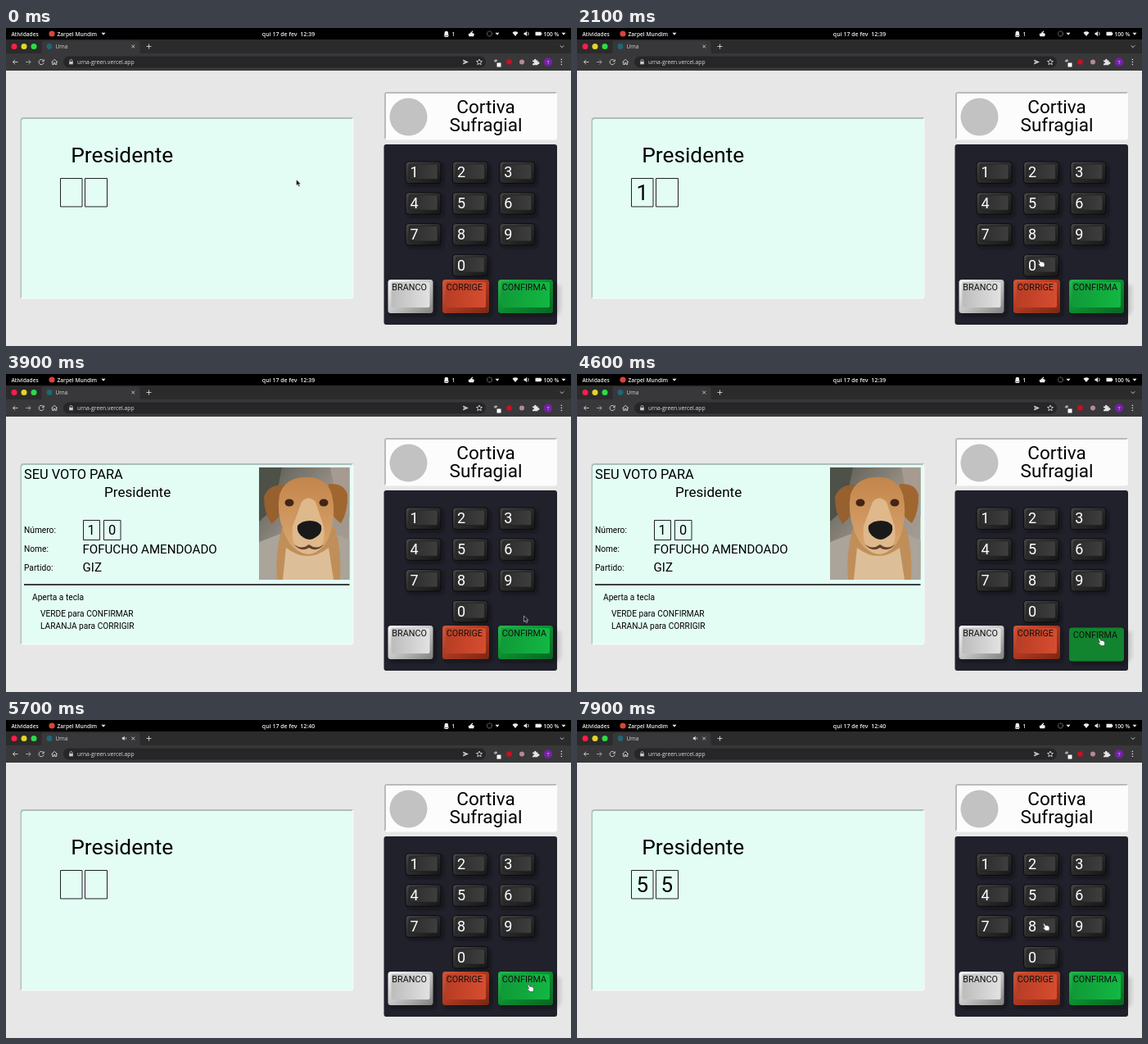
An HTML page for the animation above (8000 ms loop, 690 by 388 pixels).

```html
<!DOCTYPE html>
<html lang="pt-BR">
<head>
<meta charset="utf-8">
<title>Urna</title>
<style>
html, body { margin: 0; width: 100%; height: 100%; overflow: hidden; background: #e6e7e6; }
svg { display: block; width: 690px; height: 388px; font-family: Roboto, sans-serif; cursor: default; user-select: none; }
.ui { font-family: "Open Sans", sans-serif; font-size: 6.6px; fill: #dcdcdc; }
.bold { font-weight: 600; fill: #eee; }
.line { fill: none; stroke: #d2d3d5; stroke-width: .9; }
.mid { text-anchor: middle; }
.box { fill: none; stroke: #222; stroke-width: 1; }
</style>
</head>
<body>
<svg id="stage" viewBox="0 0 690 388" xmlns="http://www.w3.org/2000/svg">
  <defs>
    <linearGradient id="rim" x2="1" y2="1"><stop stop-color="#484848"/><stop offset=".5" stop-color="#2b2b2b"/><stop offset="1" stop-color="#161616"/></linearGradient>
    <linearGradient id="face" x2="1"><stop stop-color="#2c2c2c"/><stop offset="1" stop-color="#3e3e3e"/></linearGradient>
    <linearGradient id="whiteRim" x2="1" y2="1"><stop stop-color="#f4f4f4"/><stop offset=".5" stop-color="#c6c6c6"/><stop offset="1" stop-color="#808080"/></linearGradient>
    <linearGradient id="whiteFace" x2="1"><stop stop-color="#bcbcbc"/><stop offset="1" stop-color="#e2e2e2"/></linearGradient>
    <linearGradient id="redRim" x2="1" y2="1"><stop stop-color="#d0573b"/><stop offset=".5" stop-color="#aa3820"/><stop offset="1" stop-color="#7a2613"/></linearGradient>
    <linearGradient id="redFace" x2="1"><stop stop-color="#b83d25"/><stop offset="1" stop-color="#d64d30"/></linearGradient>
    <linearGradient id="greenRim" x2="1" y2="1"><stop stop-color="#25b84d"/><stop offset=".5" stop-color="#0b8c30"/><stop offset="1" stop-color="#086422"/></linearGradient>
    <linearGradient id="greenFace" x2="1"><stop stop-color="#109a38"/><stop offset="1" stop-color="#12b843"/></linearGradient>
    <linearGradient id="wall" x2="1" y2="1"><stop stop-color="#55584f"/><stop offset=".5" stop-color="#9a9188"/><stop offset="1" stop-color="#aaa298"/></linearGradient>
    <linearGradient id="fur" x2="0" y2="1"><stop stop-color="#c4854a"/><stop offset="1" stop-color="#d8a873"/></linearGradient>
    <filter id="soft" x="-30%" y="-30%" width="160%" height="160%"><feGaussianBlur stdDeviation="2"/></filter>
    <clipPath id="photo"><path d="M309 114H419.5V251H309z"/></clipPath>
  </defs>

  <!-- desktop bar -->
  <path d="M0 0H690V14H0z"/>
  <g class="ui bold">
    <text x="6.5" y="9.5">Atividades</text>
    <circle cx="56" cy="7" r="3.6" fill="#db4437"/>
    <text x="62.5" y="9.5">Zarpel Mundim</text>
    <text class="mid" x="345" y="9.5" id="clock" xml:space="preserve" style="font-size:7px"></text>
    <text x="544.5" y="9.5">1</text>
    <text x="656.5" y="9.5">100 %</text>
    <path d="M116.500 5.800h5l-2.500 3zM597.500 5.800h5l-2.500 3zM678.500 5.800h5l-2.500 3z"/>
    <path d="M534.500 9.500l1-1.500V6a2.300 2.300 0 0 1 4.600 0V8l1 1.500zM535.500 10h4.500v1h-4.500z"/>
    <path d="M564.500 7.500l2-1 3-3 1 .6-1.600 2 2.200.3.8 1.600-1 2.300h-5.400z"/>
    <circle cx="590.5" cy="7" r="3" fill="none" stroke="#bbb" stroke-width=".8" stroke-dasharray="1.5 .7"/>
    <path d="M618.500 5.700a5 5 0 0 1 7 0L622 10z"/>
    <path d="M632.500 5.700h1.600l2-1.900v6.400l-2-1.900h-1.600z"/>
    <path d="M637.300 5q2 2 0 4" fill="none" stroke="#eee" stroke-width=".8"/>
    <path d="M646.500 4.800h6.800v1h1v2.400h-1v1h-6.800z"/>
  </g>

  <!-- browser frame -->
  <path d="M0 14H690V32H0z" fill="#2b2b2c"/>
  <path d="M0 31H690V52H0z" fill="#38383a"/>
  <path d="M41 31.500q2.500 0 2.500-3V18.500q0-3 3-3H160.500q3 0 3 3V28.500q0 3 3 3z" fill="#38383a"/>
  <circle cx="10" cy="22.5" r="3.5" fill="#fa1f4a"/>
  <circle cx="22" cy="22.5" r="3.5" fill="#e2d528"/>
  <circle cx="34" cy="22.5" r="3.5" fill="#2bdc4a"/>
  <circle cx="53" cy="22.5" r="3.4" fill="#1f6774"/>
  <text class="ui" x="60.5" y="25" style="font-size:6.4px">Urna</text>
  <g id="sound" fill="#e4e4e4"><path d="M141.800 21.300h1.300l1.700-1.600v5.400l-1.700-1.600h-1.300z"/><path d="M146 21q1.400 1.400 0 2.800" fill="none" stroke="#e4e4e4" stroke-width=".7"/></g>
  <path class="line" d="M153.500 20.700l3.600 3.600m0-3.600l-3.600 3.600M171.500 22.500h6m-3-3v6M676.700 21.400l2.300 2.300 2.300-2.300"/>
  <path class="line" d="M14.500 41.500h-6m2.600-2.700L8.400 41.500l2.700 2.700"/>
  <path class="line" style="stroke:#a9aaad" d="M24 41.500h6m-2.600-2.700l2.700 2.700-2.700 2.700"/>
  <path class="line" d="M45.600 39.600a3.100 3.100 0 1 0 .6 2.600M46.300 38.300v2.300H44M55.500 41.700l3.700-3.300 3.700 3.300M56.700 41v3.500h1.700v-2h1.600v2h1.700V41"/>
  <rect x="70" y="34.5" width="516" height="14" rx="7" fill="#262628"/>
  <path d="M77.200 41h4.600v3.300h-4.600z" fill="#c8c9cb"/>
  <path d="M78 41v-1a1.500 1.500 0 0 1 3 0v1" fill="none" stroke="#c8c9cb" stroke-width=".8"/>
  <text class="ui" x="87" y="44" style="font-size:6.8px">urna-green.vercel.app</text>
  <path d="M558 38.500l7 3-7 3 .7-2.500 3-.5-3-.5z" fill="#d0d1d4"/>
  <path class="line" d="M578 38l1 2.300 2.500.2-1.900 1.700.6 2.500-2.200-1.300-2.200 1.300.6-2.500-1.900-1.700 2.500-.2z"/>
  <path d="M595.500 40l3-2 2 2-3 2z" fill="#aaa"/><path d="M599.500 42.500h5v5h-5z" fill="#fff"/>
  <circle cx="614.5" cy="41.5" r="3.3" fill="#c9101f"/>
  <circle cx="630" cy="41.5" r="3" fill="#b58a94"/>
  <path d="M643 39.500h2a1.300 1.300 0 1 1 2.500 0h2v2a1.300 1.300 0 1 1 0 2.200v1.500h-6.500v-2a1.200 1.200 0 1 0 0-2z" fill="#e4e4e4"/>
  <circle cx="662" cy="41.5" r="5.2" fill="#7521a5"/>
  <text class="ui mid" x="662" y="43.6" style="font-size:5.8px">T</text>
  <path d="M677.700 37.700h1.400v1.400h-1.400zm0 3h1.400v1.400h-1.400zm0 3h1.400v1.400h-1.400z" fill="#ddd"/>

  <!-- page -->
  <path d="M0 52H690V388H0z" fill="#e6e7e6"/>
  <rect x="17.5" y="109" width="407" height="221.5" rx="4" fill="#f3faf7"/>
  <path d="M17.500 330V113q0-4 4-4H424l-3 3H20V327z" fill="#adbfb9"/>
  <rect x="19" y="111" width="404" height="218" rx="3" fill="#e3fdf5"/>

  <g id="entry">
    <text x="79.2" y="163.500" font-size="26.3">Presidente</text>
    <path class="box" d="M66.500 183.500h26.500v34.500h-26.500zM96.500 183.500h27v34.500h-27z"/>
    <g class="mid" font-size="26"><text x="79.8" y="210" id="d0"></text><text x="109.8" y="210" id="d1"></text></g>
  </g>

  <g id="summary">
    <g font-size="16.4">
      <text x="22" y="128">SEU VOTO PARA</text>
      <text x="120" y="150" font-size="17.1">Presidente</text>
      <text class="mid" x="104" y="196.300">1</text>
      <text class="mid" x="129.5" y="196.300">0</text>
      <text x="93.5" y="218.500" font-size="15.1">FOFUCHO AMENDOADO</text>
      <text x="93.5" y="241.300" font-size="15.1">GIZ</text>
    </g>
    <path class="box" d="M94.500 178.500h20v24h-20zM119.500 178.500h20.500v24h-20.500z"/>
    <g font-size="10.2">
      <text x="22" y="194">Número:</text>
      <text x="22" y="216.500">Nome:</text>
      <text x="22" y="239.500">Partido:</text>
      <text x="32" y="276.300">Aperta a tecla</text>
      <text x="42" y="296.300">VERDE para CONFIRMAR</text>
      <text x="42" y="311.300">LARANJA para CORRIGIR</text>
    </g>
    <path d="M22 256.300H419.500V257.700H22z"/>
    <g clip-path="url(#photo)">
      <path d="M309 114H420V251H309z" fill="url(#wall)"/>
      <path d="M309 114h28l-10 50-18 16z" fill="#4d5148"/>
      <path d="M396 114h24v60l-14-8z" fill="#a79a90"/>
      <path d="M309 205l26-10v56h-26zM402 195l18 8v48h-18z" fill="#aaa49a"/>
      <path d="M337 188q-9 32-6 63h77q2-36-6-63z" fill="#c08f59"/>
      <path d="M342 212q26 20 52 0l6 39h-62z" fill="#dcbf98"/>
      <path d="M342 135q-22-1-27 15 0 20 9 33 12-8 17-29z" fill="#96602f"/>
      <path d="M394 134q19-1 23 13 1 21-8 35-13-8-17-29z" fill="#9f672f"/>
      <path d="M366 126q25-1 32 21 5 22-1 44-8 28-28 28t-30-27q-9-23-5-45 7-21 32-21z" fill="url(#fur)"/>
      <path d="M361 156q8-9 17 0l10 30q4 31-18 34-23-1-20-34z" fill="#dfb88b"/>
      <ellipse cx="346" cy="157" rx="5.5" ry="4.500" fill="#422515"/>
      <ellipse cx="388" cy="157" rx="5.5" ry="4.500" fill="#422515"/>
      <path d="M356 185q5-6 15-6t14 6q2 10-8 15-6 4-13 0-10-6-8-15z" fill="#19191a"/>
      <path d="M370 201v7q-9 7-18 0 8 10 18 4 10 6 18-4-9 7-18 0" fill="#60402e"/>
    </g>
  </g>

  <rect x="462" y="78" width="211" height="58.5" rx="3" fill="#fcfcfc"/>
  <path d="M462 136V81q0-3 3-3H673l-2 2H464V134z" fill="#b9bab9"/>
  <circle cx="491.5" cy="108.5" r="23" fill="#c2c2c2"/>
  <g class="mid" font-size="22.5"><text x="586" y="104">Cortiva</text><text x="586" y="126">Sufragial</text></g>
  <path d="M672 314h6v30q-2 7-8 9z" fill="#aaa" opacity=".45" filter="url(#soft)"/>
  <rect x="461.5" y="142" width="211.5" height="220" rx="3" fill="#20212b"/>
  <g id="keys"></g>
  <g id="pointer" stroke-linejoin="round">
    <path id="arrow" d="M0 0V7.300L1.800 5.700 3 8.500 4.400 7.900 3.200 5.200H5.500z" fill="#111" stroke="#ddd" stroke-width=".6"/>
    <path id="hand" d="M-2 1.200q-.5-1.300.8-1.300L.9 3 1.400 2.500l1 .5.8-.2.9.8h.9l.6 2.700-.6 2.700H1L-2.200 6q0-1.100.9-.9l.9.3z" fill="#fff" stroke="#333" stroke-width=".6"/>
  </g>
</svg>
<script>
const LOOP = 8000, STEP = 100;
const $ = id => document.getElementById(id);

// name, place, size and colour of every key
const keys = [1, 2, 3, 4, 5, 6, 7, 8, 9].map((n, i) =>
  ({ name: n, x: 488 + i % 3 * 57.4, y: 163 + Math.floor(i / 3) * 37.8, w: 43, h: 26.5, tint: "" }));
keys.push(
  { name: 0, x: 545.4, y: 276.4, w: 43, h: 26.5, tint: "" },
  { name: "BRANCO", x: 466.5, y: 307, w: 55, h: 41, tint: "white" },
  { name: "CORRIGE", x: 533, y: 307, w: 57, h: 41, tint: "red" },
  { name: "CONFIRMA", x: 601, y: 307, w: 67, h: 41, tint: "green" });

const fills = tint => [`url(#${tint ? tint + "Rim" : "rim"})`, `url(#${tint ? tint + "Face" : "face"})`];

function keyMarkup(k) {
  const [rim, face] = fills(k.tint), big = k.tint !== "";
  const rect = (cls, dx, dy, w, h, r, fill, more = "") =>
    `<rect class="${cls}" x="${k.x + dx}" y="${k.y + dy}" width="${w}" height="${h}" rx="${r}" fill="${fill}" ${more}/>`;
  return `<g id="key${k.name}">` +
    rect("shade", 3, 3, k.w, k.h, 4, "#08080d", 'opacity=".6" filter="url(#soft)"') +
    rect("rim", 0, 0, k.w, k.h, 3.5, rim, big ? "" : 'stroke="#0c0c10"') +
    rect("face", 4, 3, k.w - 8, k.h - (big ? 10 : 8), 2, face, big ? "" : 'stroke="#1d1d1d" stroke-width=".6"') +
    `<text x="${k.x + (big ? 4.8 : 5.5)}" y="${k.y + (big ? 12.7 : 19.3)}" font-size="${big ? 10.8 : 18}" fill="${big ? "#111" : "#fff"}">${k.name}</text></g>`;
}
$("keys").innerHTML = keys.map(keyMarkup).join("");

// key, down, up
const presses = [[1, 1200, 1400], [0, 2300, 2600], ["CONFIRMA", 4500, 4800], [5, 6800, 6900], [5, 7200, 7300]];

// time, x, y of the pointer tip
const path = [
  [0, 354.5, 185], [800, 511, 171], [1400, 511, 171], [1850, 562, 306], [2100, 565.5, 282.5],
  [2800, 565.5, 282.5], [3500, 628, 288.5], [3800, 628, 288.5], [4100, 645, 314], [4300, 639, 322.5],
  [5800, 639, 322.5], [6600, 566.5, 210.5], [7700, 566.5, 210.5], [7900, 571.5, 248], [8000, 571.5, 248]];

function pointerAt(t) {
  const i = path.findIndex(p => p[0] > t);
  const [t0, x0, y0] = path[i - 1], [t1, x1, y1] = path[i];
  const u = (t - t0) / (t1 - t0), e = u * u * (3 - 2 * u);
  return [x0 + (x1 - x0) * e, y0 + (y1 - y0) * e];
}

const show = (id, on) => $(id).setAttribute("visibility", on ? "visible" : "hidden");
const within = (t, a, b) => t >= a && t < b;

function drawKey(k, down) {
  const g = $("key" + k.name), [rim, face] = fills(k.tint);
  const flat = k.tint === "green" ? "#12832f" : "#242424";
  g.setAttribute("transform", down ? "translate(0 2.5)" : "");
  g.querySelector(".rim").setAttribute("fill", down ? flat : rim);
  g.querySelector(".face").setAttribute("fill", down ? flat : face);
}

function render(t) {
  $("d0").textContent = within(t, 1400, 3700) ? "1" : t >= 6900 ? "5" : "";
  $("d1").textContent = within(t, 2600, 3700) ? "0" : t >= 7300 ? "5" : "";
  show("entry", t < 3700 || t >= 5700);
  show("summary", within(t, 3700, 4800));
  show("sound", t >= 5000);
  $("clock").textContent = "qui 17 de fev  12:" + (t < 5700 ? 39 : 40);

  for (const k of keys) drawKey(k, presses.some(([n, a, b]) => n === k.name && within(t, a, b)));

  const [x, y] = pointerAt(t);
  const over = keys.some(k => within(x, k.x, k.x + k.w) && within(y, k.y, k.y + k.h));
  $("pointer").setAttribute("transform", `translate(${x} ${y})`);
  show("arrow", !over);
  show("hand", over);
}

const start = performance.now();
function tick() {
  const t = (performance.now() - start) % LOOP;
  render(Math.floor(t / STEP) * STEP);
  requestAnimationFrame(tick);
}
tick();
</script>
</body>
</html>
```
